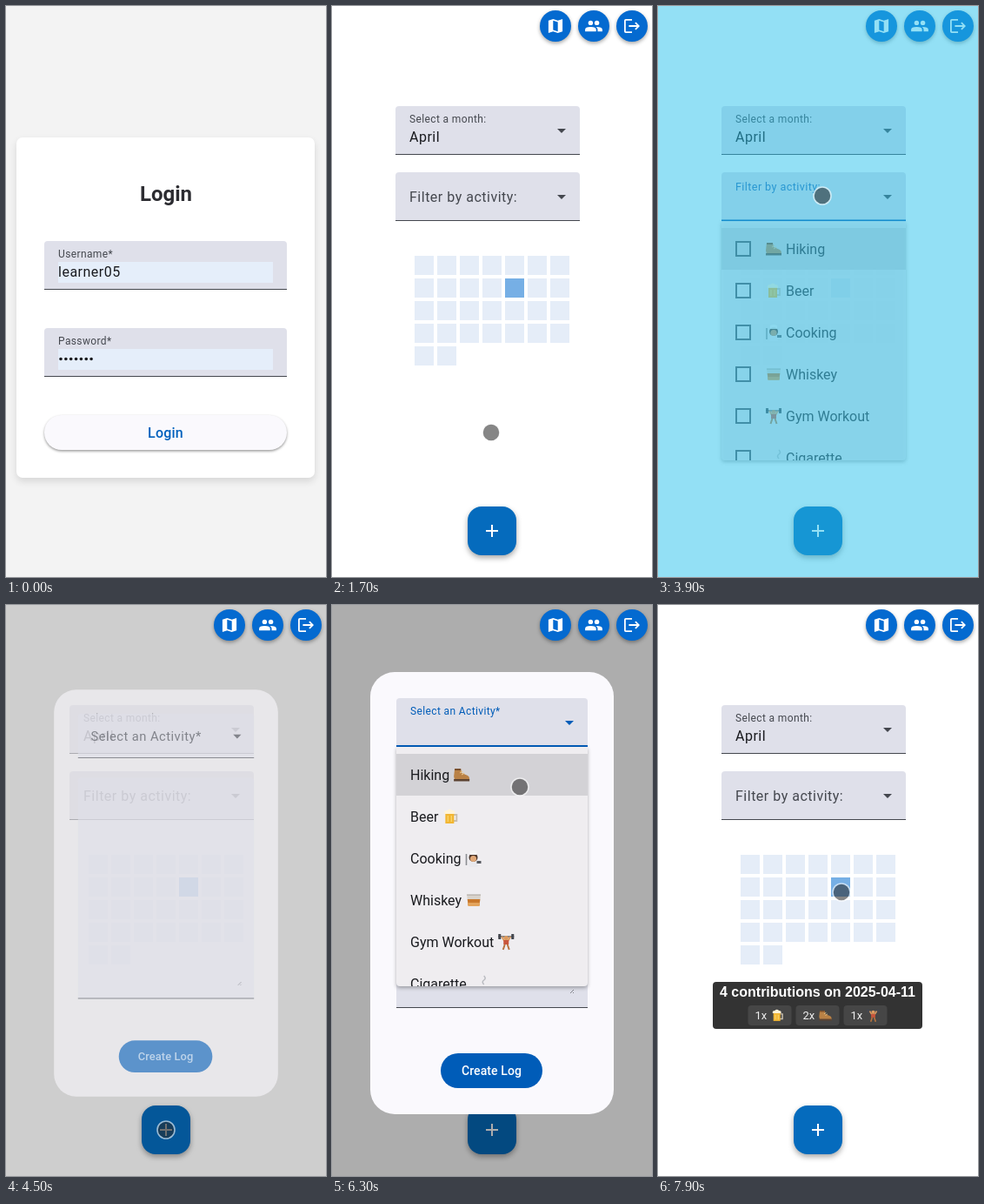
These frames come from a looping animation (368 px wide and 656 px high, 8 s). An HTML page with a canvas:

```html
<!DOCTYPE html>
<html lang="en">
<head>
<meta charset="utf-8">
<title>Activity log demo</title>
<style>
html, body { margin: 0; width: 100%; height: 100%; overflow: hidden; background: #fff; }
canvas { display: block; width: 100vw; height: 100vh; }
</style>
</head>
<body>
<canvas id="stage"></canvas>
<script>
const W = 368, H = 656, LOOP = 8000, STEP = 100;
const canvas = document.getElementById('stage');
const ctx = canvas.getContext('2d');

const BLUE = '#005cb8', ICON = '#046ad0', FAB = '#056bbd';
const INK = '#1a1b1f', MUTED = '#44474e', FIELD = '#dfe0ea', PANEL = '#efedf0', SURFACE = '#faf9fd';
const ACTIVITIES = ['Hiking', 'Beer', 'Cooking', 'Whiskey', 'Gym Workout', 'Cigarette'];

// ---- timing ----
function track(t, keys, ease = u => u) {
  if (t <= keys[0][0]) return keys[0].slice(1);
  for (let i = 1; i < keys.length; i++) {
    const a = keys[i - 1], b = keys[i];
    if (t < b[0]) {
      const u = ease((t - a[0]) / (b[0] - a[0]));
      return a.slice(1).map((v, k) => v + (b[k + 1] - v) * u);
    }
  }
  return keys[keys.length - 1].slice(1);
}
const value = (t, ...keys) => track(t, keys)[0];
const smooth = u => u * u * (3 - 2 * u);
const POINTER = [
  [300, 300, 300], [500, 140, 405], [700, 140, 405], [1000, 36, 443],
  [1350, 183, 490], [1900, 183, 490], [2700, 199, 227], [3000, 199, 227],
  [3900, 189, 218], [4000, 189, 218], [4400, 184, 603], [4600, 184, 603],
  [4900, 234, 136], [5300, 234, 136], [6100, 216, 209], [6400, 216, 209],
  [6700, 184, 535], [6900, 184, 535], [7400, 211, 330]
];

// ---- drawing helpers ----
function shape(x, y, w, h, r, color) {
  ctx.beginPath();
  ctx.roundRect(x, y, w, h, r);
  ctx.fillStyle = color;
  ctx.fill();
}
function disc(x, y, r, color) {
  ctx.beginPath();
  ctx.arc(x, y, r, 0, Math.PI * 2);
  ctx.fillStyle = color;
  ctx.fill();
}
function path(d, color, rule = 'nonzero') {
  ctx.fillStyle = color;
  ctx.fill(new Path2D(d), rule);
}
function line(d, color, width) {
  ctx.strokeStyle = color;
  ctx.lineWidth = width;
  ctx.stroke(new Path2D(d));
}
function text(s, x, y, { size = 16, weight = 400, color = INK, gap = 0, align = 'left', family = 'Roboto' } = {}) {
  ctx.font = `${weight} ${size}px "${family}", sans-serif`;
  ctx.letterSpacing = gap + 'px';
  ctx.textAlign = align;
  ctx.fillStyle = color;
  ctx.fillText(s, x, y);
}
function group(draw, alpha = 1) {
  if (alpha <= 0) return;
  ctx.save();
  ctx.globalAlpha *= alpha;
  draw();
  ctx.restore();
}
function raised(dy, blur, alpha, draw) {
  ctx.save();
  ctx.shadowColor = `rgba(0,0,0,${alpha})`;
  ctx.shadowBlur = blur * ratio;
  ctx.shadowOffsetY = dy * ratio;
  draw();
  ctx.restore();
}
function dots(x, y, n, r, color) {
  for (let i = 0; i < n; i++) disc(x + i * 5.85, y, r, color);
}
function arrow(x, y, color) {
  path(`M${x - 5} ${y - 2.5}h10l-5 5z`, color);
}

// ---- small pictograms in a 20 unit box ----
const PICTOS = {
  Hiking() {
    path('M2 3h7l1 5 7 3q2 1 2 4v1H2l-1-4z', '#b98145');
    path('M1 15h18v2.5H1z', '#5c4230');
    path('M2 3h7v2H2z', '#7a4f2c');
    line('M8 8l3-2M10 10l3-2', '#e8c48a', 1.2);
  },
  Beer() {
    line('M13 8h4v7h-4', '#c9bfae', 1.8);
    path('M4 6h10v12H4z', '#f2b632');
    line('M7 9v7M11 9v7', '#f9d56c', 1.3);
    path('M3 7q-1-4 3-4 3-3 6 0 4 0 3 4z', '#fff3d6');
  },
  Cooking() {
    path('M5 20v-5q5-3 10 0v5z', '#e9e9ee');
    disc(10, 9, 5, '#4a3428');
    disc(10, 10.5, 3.6, '#e0a878');
    path('M6 6V2q4-2 8 0v4z', '#f4f4f4');
    line('M2 5v13', '#8b8d92', 1.6);
    path('M14 13h5v3h-5z', '#55585e');
  },
  Whiskey() {
    path('M2 4h16l-1.5 13h-13z', '#d9d3cc');
    path('M2.7 9h14.6l-.8 7h-13z', '#c9782b');
    path('M3 13h14l-.5 4h-13z', '#e3a45c');
    line('M2 4h16', '#a9a29b', 1);
  },
  'Gym Workout'() {
    line('M1 4h18', '#55585e', 1.4);
    path('M1 1h3v6H1zM16 1h3v6h-3z', '#44474e');
    line('M5 4l3 5M15 4l-3 5', '#dc9a5e', 2);
    disc(10, 5.5, 2.6, '#dc9a5e');
    path('M7 8h6v5H7z', '#c9563c');
    line('M8.500 13l-2 6M11.500 13l2 6', '#b8743f', 2);
  },
  Cigarette() {
    path('M1 13h14v3H1z', '#f6f4f1');
    path('M1 13h5v3H1z', '#dc9b55');
    path('M15 13h2v3h-2z', '#d3533a');
    line('M16 11q-3-3 0-5t0-5', '#b9bbc0', 1.5);
  }
};
function picto(name, x, y, size = 20) {
  ctx.save();
  ctx.translate(x, y - size / 2);
  ctx.scale(size / 20, size / 20);
  PICTOS[name]();
  ctx.restore();
}

// ---- form parts ----
function field(x, y, w, h, focus = 0) {
  shape(x, y, w, h, [4, 4, 0, 0], FIELD);
  ctx.fillStyle = MUTED;
  ctx.fillRect(x, y + h - 0.5, w, 1);
  ctx.fillStyle = BLUE;
  if (focus > 0) ctx.fillRect(x + w * (1 - focus) / 2, y + h - 1, w * focus, 2);
}
function label(s, x, y, lift, color = MUTED) {
  const k = 1 - 0.25 * lift;
  text(s, x, y + 34 - 15 * lift, { size: 16 * k, gap: 0.5 * k, color });
}
function optionPanel(x, y, w, p, alpha, bar, row) {
  group(() => {
    ctx.translate(0, y);
    ctx.scale(1, 0.8 + 0.2 * p);
    raised(2, 4, 0.3, () => shape(x, 0, w, 275, [0, 0, 4, 4], PANEL));
    ctx.beginPath();
    ctx.rect(x, 0, w, 275);
    ctx.clip();
    ctx.fillStyle = '#d3d2d6';
    ctx.fillRect(x, 8, w, 48);
    ACTIVITIES.forEach((name, i) => row(name, 32 + 48 * i));
    group(() => shape(x + w - 7, 4, 3, 183, 1.5, '#b5b4b9'), bar);
  }, alpha);
}

// ---- screens ----
function credentials(t) {
  const focus = t >= 500 && t < 1400;
  ctx.fillStyle = '#f3f3f3';
  ctx.fillRect(0, 0, W, H);
  raised(4, 8, 0.12, () => shape(12, 151, 343, 391, 7, '#fff'));
  text('Login', 184, 224, { size: 24, weight: 700, color: '#2c2c31', align: 'center' });
  field(44, 270, 279, 55.5);
  field(44, 370, 279, 55.5, focus ? 1 : 0);
  for (const y of [294, 394]) {
    ctx.fillStyle = '#e5eefa';
    ctx.fillRect(60, y, 247, 24);
  }
  label('Username*', 60, 270, 1);
  label('Password*', 60, 370, 1, focus ? BLUE : MUTED);
  text('learner05', 60, 311, { gap: 0.5 });
  dots(63, 405.5, 7, 1.8, INK);
  if (focus) {
    ctx.fillStyle = INK;
    ctx.fillRect(101, 396, 1, 19);
  }
  raised(1.5, 3, 0.4, () => shape(44, 470, 279, 40, 20, SURFACE));
  text('Login', 183.500, 496, { weight: 500, color: '#0061bd', gap: 0.2, align: 'center' });
  group(savedLogins, value(t, [500, 0], [700, 1], [900, 1], [1000, 0.68], [1200, 0]));
}
function savedLogins() {
  const dark = '#3a3a3a', font = { size: 14.8, family: 'Noto Sans', color: '#fff' };
  raised(1, 5, 0.35, () => {
    ctx.beginPath();
    ctx.roundRect(125, 430, 236, 223, 5);
    ctx.moveTo(136, 430);
    ctx.lineTo(145, 421);
    ctx.lineTo(154, 430);
    ctx.fillStyle = dark;
    ctx.fill();
  });
  [['learner05', 7], ['owner@e.example', 8], ['dogwalker@e.example', 8]].forEach(([name, n], i) => {
    const y = 463 + 57 * i;
    disc(145, y, 7, '#f0f0f0');
    path(`M139 ${y - 2}l5 1 2 3-3 1v3l-3-3zM145 ${y - 6}l4 2-1 3-3-1zM147 ${y + 2}h4l-3 4z`, '#555');
    text(name, 164, y - 7, font);
    dots(167, y + 11, n, 1.9, '#a5a5a5');
  });
  ctx.fillStyle = '#484848';
  ctx.fillRect(125, 610, 236, 1);
  disc(145, 632, 7, '#f0f0f0');
  text('Manage passwords…', 164, 637, { ...font, color: '#a8a8a8' });
  disc(340, 632, 5, '#58a8de');
}

function calendar() {
  for (let i = 0; i < 30; i++) {
    ctx.fillStyle = i === 11 ? '#76afe5' : '#e5edf8';
    ctx.fillRect(95 + 26 * (i % 7), 287 + 26 * Math.floor(i / 7), 22, 22);
  }
}
function tooltip() {
  shape(63, 433, 241, 54, 4, '#333');
  text('4 contributions on 2025-04-11', 183.5, 450, { weight: 700, color: '#fff', align: 'center', family: 'Liberation Sans' });
  [['1x', 'Beer'], ['2x', 'Hiking'], ['1x', 'Gym Workout']].forEach(([n, name], i) => {
    const x = 103.5 + 55 * i;
    shape(x, 460, 50, 23, 4, '#464646');
    text(n, x + 8, 476, { size: 13, color: '#f0f0f0' });
    picto(name, x + 26, 471.5, 16);
  });
}
function home(t) {
  const lift = value(t, [2700, 0], [2800, 0.71], [2900, 1], [3800, 1], [3900, 0.84], [4000, 0.1], [4100, 0]);
  const focus = value(t, [2700, 0], [2800, 0.57], [2900, 1], [3900, 1], [4100, 0]);
  ctx.fillStyle = '#fff';
  ctx.fillRect(0, 0, W, H);
  calendar();
  field(73, 115, 212, 55.5);
  label('Select a month:', 89, 115, 1);
  text('April', 89, 156, { gap: 0.5 });
  arrow(264, 143.5, MUTED);
  field(73, 191, 212, 55.5, focus);
  label('Filter by activity:', 89, 191, lift, focus > 0.5 ? '#2a6db8' : MUTED);
  arrow(264, 219.5, focus > 0.5 && t < 3000 ? BLUE : MUTED);
  group(() => shape(73, 191, 212, 55, [4, 4, 0, 0], 'rgb(41,193,235)'),
    value(t, [2700, 0], [2800, 0.5], [3000, 0]));
  raised(3, 6, 0.35, () => shape(156, 575, 56, 56, 16, FAB));
  line('M177 603h14M184 596v14', '#fff', 2);
  const open = value(t, [2700, 0], [2800, 0.875], [2900, 1]);
  const shown = value(t, [2700, 0], [2800, 0.97], [2900, 1], [3800, 1], [3900, 0.86], [4000, 0]);
  const bar = value(t, [3200, 1], [3500, 0]);
  optionPanel(73, 247, 212, open, shown, bar, (name, y) => {
    ctx.strokeStyle = MUTED;
    ctx.lineWidth = 2;
    ctx.strokeRect(90, y - 8, 16, 16);
    picto(name, 123, y);
    text(name, 147, y + 5.5);
  });
  if (t >= 7500) tooltip();
}
function dialog(t) {
  const alpha = value(t, [4400, 0], [4500, 0.6], [4600, 1], [6800, 1], [6900, 0.4], [7000, 0]);
  if (alpha <= 0) return;
  ctx.fillStyle = `rgba(0,0,0,${0.32 * alpha})`;
  ctx.fillRect(0, 0, W, H);
  const scale = t < 5000 ? 0.8 + 0.2 * alpha : 1;
  const focus = t >= 4900 && t < 6700;
  const chosen = t >= 6400;
  group(() => {
    ctx.translate(184, 331);
    ctx.scale(scale, scale);
    ctx.translate(-184, -331);
    shape(44, 77, 280, 508, 28, SURFACE);
    field(74, 107, 220, 55, focus ? 1 : 0);
    label('Select an Activity*', 90, 107, focus || chosen ? 1 : 0, focus ? BLUE : MUTED);
    arrow(273, 135.5, focus ? BLUE : MUTED);
    if (chosen) {
      text('Hiking', 90, 148, { gap: 0.5 });
      picto('Hiking', 142, 142);
    }
    field(74, 187, 220, 275.5);
    line('M274 446l4-4M277 446l1-1', '#6a6c73', 0.8);
    shape(125, 515, 117, 40, 20, BLUE);
    text('Create Log', 183.5, 540, { size: 14, weight: 500, color: '#fff', gap: 0.1, align: 'center' });
    optionPanel(74, 163, 220,
      value(t, [4900, 0], [5000, 0.9], [5100, 1]),
      value(t, [4900, 0], [5000, 1], [6300, 1], [6400, 0.7], [6500, 0]),
      value(t, [5300, 1], [5600, 0]),
      (name, y) => {
        text(name, 90, y + 5.5);
        picto(name, 94 + ctx.measureText(name).width, y);
      });
  }, alpha);
}
function toolbar() {
  for (const x of [257, 301, 345]) raised(2, 4, 0.35, () => disc(x, 23, 18, ICON));
  const glyph = (x, draw) => {
    ctx.save();
    ctx.translate(x, 23);
    ctx.scale(0.9, 0.9);
    ctx.translate(-12, -12);
    draw();
    ctx.restore();
  };
  glyph(257, () => path('M3 5l6-2 6 2 6-2v16l-6 2-6-2-6 2zM9 5v12l6 2V7z', '#fff', 'evenodd'));
  glyph(301, () => {
    disc(8, 8, 3, '#fff');
    disc(16, 8, 3, '#fff');
    path('M1 19v-2.500q0-3.500 7-3.500t7 3.500V19zM15 13q8 0 8 3.500V19h-6v-2.500q0-2-2-3.500z', '#fff');
  });
  glyph(345, () => path('M17 7l-1.400 1.400L18.200 11H8v2h10.200l-2.600 2.600L17 17l5-5zM4 5h8V3H4q-2 0-2 2v14q0 2 2 2h8v-2H4z', '#fff'));
}
function pointer(t) {
  if (t < 300) return;
  const [x, y] = track(t, POINTER, smooth);
  disc(x, y, 9.5, 'rgba(40,40,40,.56)');
  ctx.beginPath();
  ctx.arc(x, y, 10, 0, Math.PI * 2);
  ctx.strokeStyle = 'rgba(255,255,255,.6)';
  ctx.lineWidth = 1.6;
  ctx.stroke();
}

// ---- loop ----
let ratio = 1;
function resize() {
  ratio = window.devicePixelRatio || 1;
  canvas.width = Math.round(W * ratio);
  canvas.height = Math.round(H * ratio);
}
function render(t) {
  ctx.setTransform(ratio, 0, 0, ratio, 0, 0);
  if (t < 1600) {
    credentials(t);
  } else {
    home(t);
    dialog(t);
    toolbar();
    group(() => shape(0, 0, W, H, 0, 'rgb(41,193,235)'),
      value(t, [3800, 0], [3900, 0.5], [4100, 0]));
  }
  pointer(t);
}
function tick(now) {
  render(Math.floor((now % LOOP) / STEP) * STEP);
  requestAnimationFrame(tick);
}
addEventListener('resize', resize);
resize();
tick(performance.now());
</script>
</body>
</html>
```
